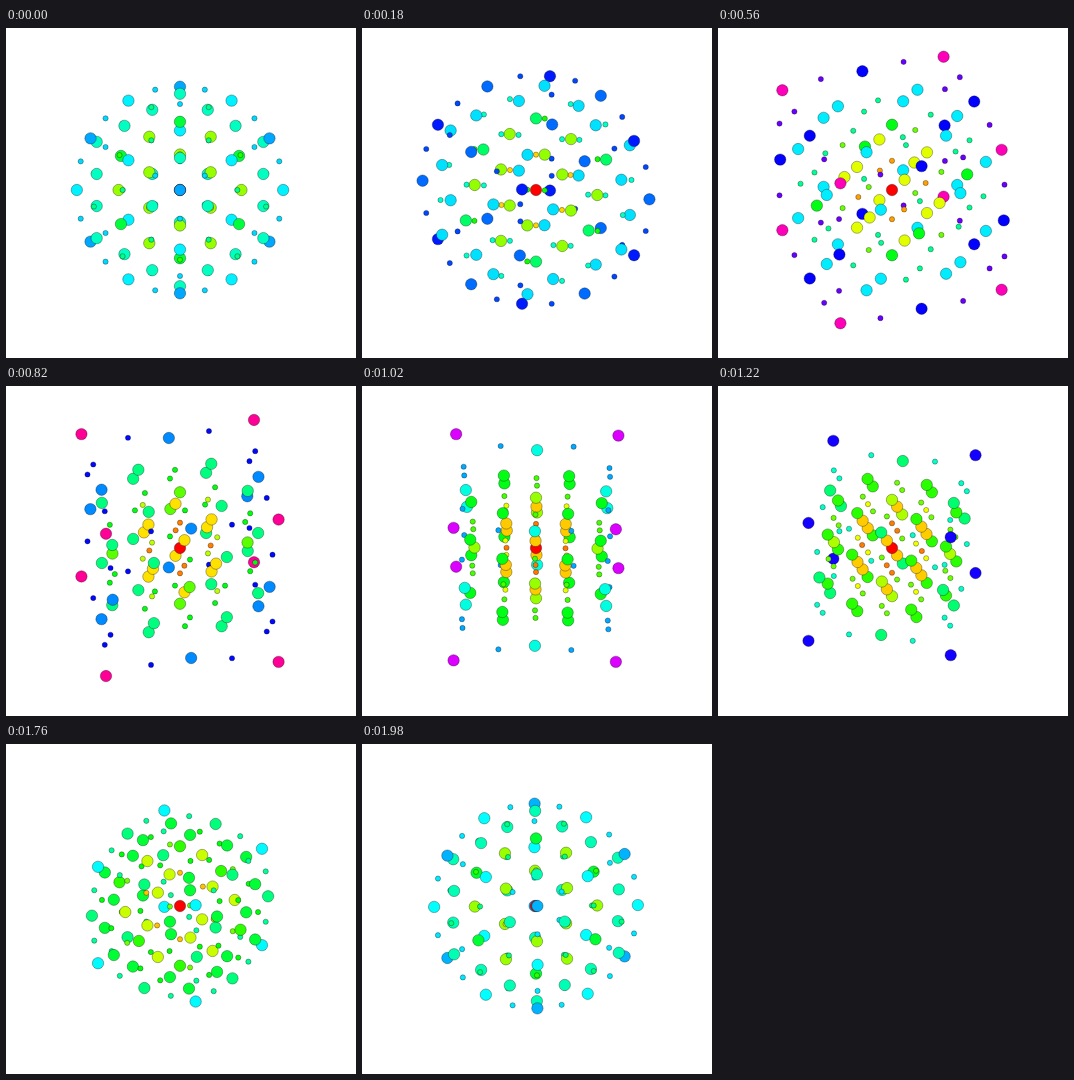
Animation of 350 by 330 pixels, one loop 2 s. Source, as an HTML page with a canvas:

```html
<!DOCTYPE html>
<html lang="en">
<head>
<meta charset="utf-8">
<title>Breathing lattice</title>
<style>
html, body { margin: 0; width: 350px; height: 330px; overflow: hidden; background: #fff; }
canvas { display: block; }
</style>
</head>
<body>
<canvas id="stage" width="350" height="330"></canvas>
<script>
const ctx = document.getElementById('stage').getContext('2d');
const LOOP = 2000, STEP = 20;
const CX = 174, CY = 162, UNIT = 36;
const RAD = Math.PI / 180;
const tiltSin = Math.sqrt(1 / 3), tiltCos = Math.sqrt(2 / 3);

// Two interleaved face-centred lattices: large dots on even sites, small on odd.
const sites = [];
for (let x = -2; x <= 2; x++)
  for (let y = -2; y <= 2; y++)
    for (let z = -2; z <= 2; z++)
      sites.push({ x, y, z, sq: x * x + y * y + z * z, size: (x + y + z) % 2 ? 2.6 : 5.7 });

// Each shell swells and shrinks, lagging behind the shells inside it.
function place(site, t) {
  const turn = (45 - 90 * t / LOOP) * RAD;
  const s = Math.sin(turn), c = Math.cos(turn);
  const phase = (360 * t / LOOP + 92 - 11.03 * site.sq) * RAD;
  const scale = UNIT * Math.exp(0.2 * Math.sin(phase));
  const { x, y, z } = site;
  const across = y * c - x * s;
  return {
    x: CX + scale * (x * c + y * s),
    y: CY + scale * (across * tiltSin + z * tiltCos),
    depth: scale * (z * tiltSin - across * tiltCos),
    hue: 0.175 * Math.pow(scale * Math.sqrt(site.sq), 1.5),
    size: site.size
  };
}

function draw(t) {
  ctx.fillStyle = '#fff';
  ctx.fillRect(0, 0, 350, 330);
  ctx.strokeStyle = 'rgba(0, 0, 0, 0.8)';
  ctx.lineWidth = 0.4;
  const dots = sites.map(site => place(site, t)).sort((a, b) => b.depth - a.depth);
  for (const dot of dots) {
    ctx.beginPath();
    ctx.arc(dot.x, dot.y, dot.size, 0, 2 * Math.PI);
    ctx.fillStyle = `hsl(${dot.hue}, 100%, 50%)`;
    ctx.fill();
    ctx.stroke();
  }
}

const start = performance.now();
function tick() {
  const elapsed = performance.now() - start;
  draw(Math.floor(elapsed / STEP) * STEP % LOOP);
  requestAnimationFrame(tick);
}
tick();
</script>
</body>
</html>
```
